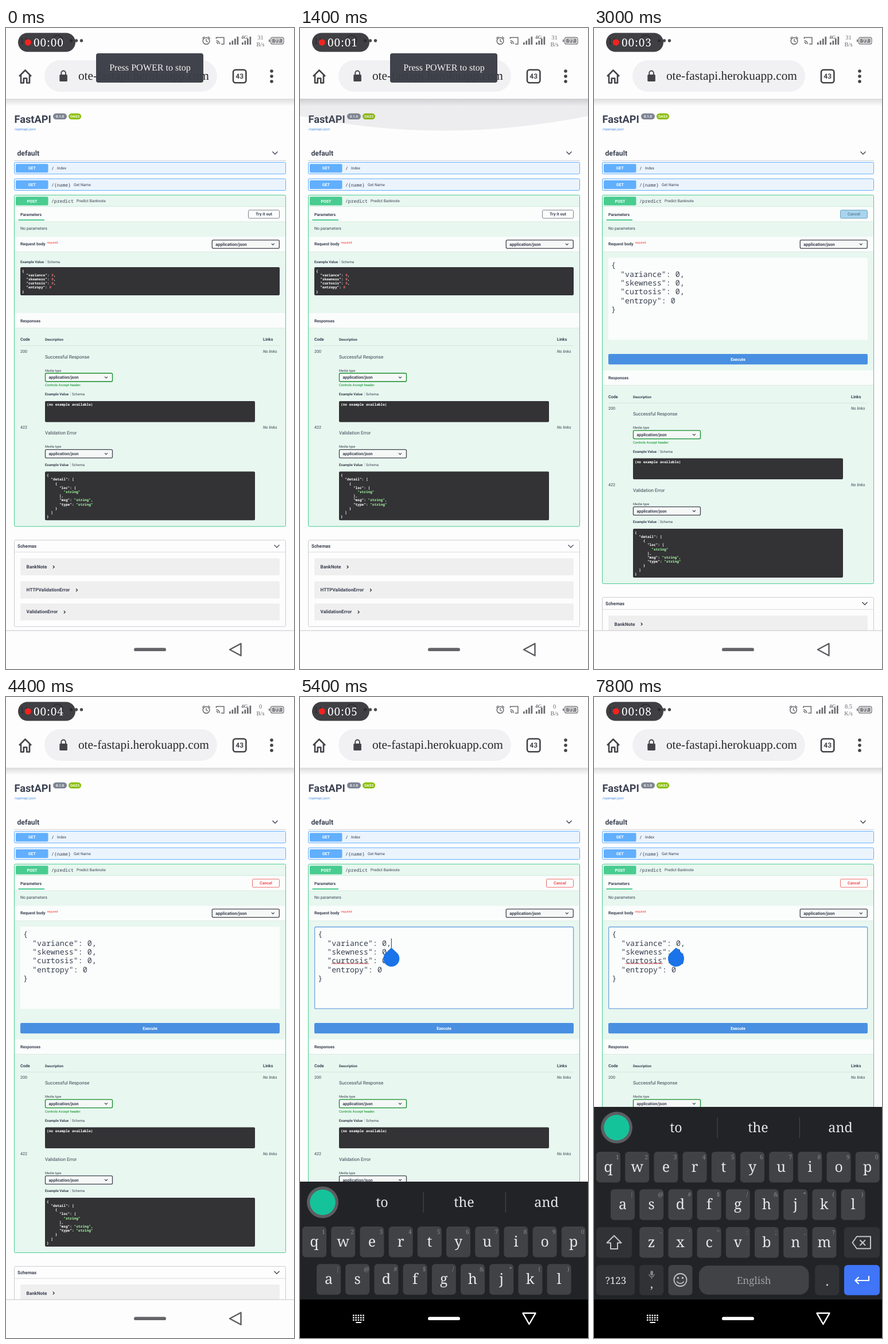
These frames come from a looping animation (502x1115 px, 8000 ms). An HTML page:

```html
<!DOCTYPE html>
<html lang="en">
<head>
<meta charset="utf-8">
<title>API docs on a phone</title>
<style>
html, body { margin: 0; width: 100%; height: 100%; overflow: hidden; background: #fff; }
svg { display: block; width: 502px; height: 1115px; }
text { font-family: Roboto, sans-serif; fill: #3b4151; white-space: pre; text-rendering: geometricPrecision; }
.b { font-weight: 700; }
.m { font-family: "Noto Sans Mono", monospace; }
.s { font-family: "Noto Serif", serif; }
.l { font-family: "Liberation Serif", serif; }
</style>
</head>
<body>
<svg id="stage" viewBox="0 0 502 1115" xmlns="http://www.w3.org/2000/svg"></svg>
<script>
const INK = '#3b4151', GREEN = '#49cc90', BLUE = '#61affe', DARK = '#444347';
const LOOP = 8000, STEP = 200, GROW = 99.6;

const esc = s => s.replace(/&/g, '&amp;').replace(/</g, '&lt;');
const text = (x, y, size, str, cls = '', more = '') =>
  `<text x="${x}" y="${y}" font-size="${size}" class="${cls}" ${more}>${esc(str)}</text>`;
const mid = (x, y, size, str, cls, fill) =>
  text(x, y, size, str, cls, `text-anchor="middle" style="fill:${fill}"`);
const tint = fill => `style="fill:${fill}"`;
const rect = (x, y, w, h, fill, rx = 0, more = '') =>
  `<rect x="${x}" y="${y}" width="${w}" height="${h}" rx="${rx}" fill="${fill}" ${more}/>`;
const edge = (color, width = 1) => `stroke="${color}" stroke-width="${width}"`;
const line = (d, color, width = 1, more = '') =>
  `<path d="${d}" fill="none" stroke="${color}" stroke-width="${width}" ${more}/>`;
const dot = (x, y, r, fill) => `<circle cx="${x}" cy="${y}" r="${r}" fill="${fill}"/>`;
const group = (id, body, more = '') => `<g id="${id}" ${more}>${body}</g>`;
const ROUND = 'stroke-linejoin="round" stroke-linecap="round"';

const down = (x, y, r, w = 1.2) =>
  line(`M${x - r} ${y - r / 2}l${r} ${r}l${r} ${-r}`, INK, w);
const right = (x, y) => line(`M${x - 1.2} ${y - 2.4}l2.4 2.4l-2.4 2.4`, '#222', 1.2);

function code(x, y, lines) {
  return lines.map((s, i) =>
    text(x, y + i * 7.2, 6.1, s, 'm b', tint('#fff'))
      .replace(/"string"(?=,?<)/, '<tspan fill="#a2fca2">$&</tspan>')
      .replace(/ 0(?=,?<)/, '<tspan fill="#d36363">$&</tspan>')).join('');
}
const panel = (x, y, w, h) => rect(x, y, w, h, '#333235', 2);

const select = (x, y, size, color) =>
  rect(x, y, 117, 14.5, '#f6f8f7', 2, edge(color, 1.3)) +
  text(x + 6, y + 9.8, size, 'application/json', 'b') + down(x + 106, y + 7.3, 2.4);

const tabs = (x, y) =>
  text(x, y, 6.2, 'Example Value', 'b') + line(`M${x + 44.3} ${y - 6}v7`, '#b5beba', .6) +
  text(x + 47, y, 6.1, 'Schema');

const verb = (y, name, color) =>
  rect(17, y, 56.5, 15, color, 2) + mid(45.4, y + 10, 7, name, 'b', '#fff');

const getRow = (y, path, x, label) =>
  rect(14.5, y, 473, 20.3, '#ebf4fd', 2, edge(BLUE)) + verb(y + 2.8, 'GET', BLUE) +
  text(79, y + 13.6, 8.1, path, 'm') + text(x, y + 12.8, 6.7, label);

const band = y => rect(15, y, 472, 26, '#fbfdfc') + rect(15, y + 25.6, 472, .8, '#d5e6dd');

function response(y, num, label, color, note) {
  return text(25, y, 7.1, num) + text(448, y, 7, 'No links', '', 'font-style="italic"') +
    text(68, y + 10, 8.1, label) + text(68, y + 33, 5.8, 'Media type') +
    select(68.5, y + 36, 7.2, color) +
    (note ? text(68, y + 58.7, 5.9, note, '', tint('#008a1c')) : '');
}

const JSON_KEYS = ['{', '  "variance": 0,', '  "skewness": 0,', '  "curtosis": 0,', '  "entropy": 0', '}'];
const DETAIL = ['{', '  "detail": [', '    {', '      "loc": [', '        "string"', '      ],',
  '      "msg": "string",', '      "type": "string"', '    }', '  ]', '}'];

const intro =
  text(14.5, 165, 18.2, 'FastAPI', 'b') +
  rect(82, 148.5, 24, 10.5, '#7d8492', 5.2) + mid(94, 156, 6, '0.1.0', 'b', '#fff') +
  rect(109, 148.5, 22, 10.5, '#89bf04', 5.2) + mid(120, 156, 6.3, 'OAS3', 'b', '#fff') +
  text(14.5, 178, 6.1, '/openapi.json', '', tint('#4990e2')) +
  text(19.5, 222, 12.2, 'default', 'b') + down(469, 217.3, 4.5, 1.3) +
  rect(14, 230, 474, .9, '#c9cacf') +
  getRow(233.6, '/', 89, 'Index') + getRow(262.2, '/{name}', 118, 'Get Name');

const post =
  `<rect id="box" x="14.5" y="290.7" width="473" height="576.3" rx="2" fill="#e8f7f0" ${edge(GREEN)}/>` +
  verb(293.5, 'POST', GREEN) + text(79, 304, 8.1, '/predict', 'm') + text(123, 303.2, 6.7, 'Predict Banknote') +
  rect(15, 310.5, 472, .8, '#b5e3cd') + band(311) +
  text(25, 326.6, 7.1, 'Parameters', 'b') + rect(21.5, 333, 45.5, 2, GREEN) +
  text(25, 351.2, 7.1, 'No parameters') +
  band(363.2) + text(25, 378.4, 7.1, 'Request body', 'b') +
  text(71.5, 375.2, 5.2, 'required', '', tint('#ff3030')) + select(359.3, 368.8, 7.5, '#41444e');

const example =
  rect(422.5, 316.8, 54, 14.2, '#fcfdfd', 2, edge('#7b7f88')) + mid(449.5, 326.3, 7.1, 'Try it out', 'b', INK) +
  group('tryTap', rect(422, 316.3, 55, 15.2, '#33b5e5', 1, 'opacity=".4"')) +
  tabs(25, 408.5) + panel(25, 416, 452, 49) + code(28, 424.6, JSON_KEYS);

const editor =
  group('cancelTap', rect(429.5, 316.8, 47, 14.2, '#a9d4ee', 2, edge('#6d9fc0')) +
    mid(453, 326.3, 7.1, 'Cancel', 'b', '#64859f')) +
  group('cancel', rect(429.5, 316.8, 47, 14.2, '#fdfdfd', 2, edge('#f06a6a')) +
    mid(453, 326.3, 7.1, 'Cancel', 'b', '#f05058')) +
  rect(25, 399.5, 452, 143, '#fafdfc', 2) +
  group('focus', rect(25.6, 400, 451, 142.2, 'none', 2, edge('#6ea4e0', 1.3)) +
    rect(55, 463.3, 65, 1, '#e0474c')) +
  group('body', JSON_KEYS.map((s, i) => text(30, 417.3 + i * 15.3, 13.3, s, 'm')).join('')) +
  group('caret', rect(-.5, 420, 1, 16.5, '#333')) +
  group('handle', '<path d="M0 436L10.2 445.4A14 14 0 1 1 -10.2 445.4Z" fill="#1a73e8"/>') +
  rect(25, 567, 452, 18.2, '#4990e2', 2) + mid(251, 578.6, 7.2, 'Execute', 'b', '#fff');

const schema = (y, h, name, x) =>
  rect(25, y, 452, h, '#f0eff0', 2) + text(35.5, y + h / 2 + 2.7, 8.15, name, 'b') + right(x, y + h / 2 + .2);

const lower =
  band(496) + text(25, 511.5, 7.1, 'Responses', 'b') +
  text(25, 544.4, 7.2, 'Code', 'b') + text(68, 544.2, 6.2, 'Description', 'b') + text(448, 544.4, 7.2, 'Links', 'b') +
  rect(25, 552.2, 452, .8, '#d0dfd7') +
  response(564.5, '200', 'Successful Response', '#128c28', 'Controls Accept header.') +
  tabs(68, 639) + panel(68, 649, 366, 36.4) + code(71, 657.3, ['(no example available)']) +
  response(697.3, '422', 'Validation Error', '#41444e') +
  tabs(68, 761.6) + panel(68, 771.5, 366, 84.8) + code(71, 780.2, DETAIL) +
  rect(14.5, 890.8, 473, 150.4, '#fdfdfd', 2, edge('#cbccd0')) +
  text(20, 904, 8, 'Schemas', 'b') + down(472, 901.4, 4.5, 1.3) + rect(15, 911.3, 472, .8, '#d3d4d8') +
  schema(922.5, 29.5, 'BankNote', 83) + schema(962.5, 30, 'HTTPValidationError', 123.3) +
  schema(1001, 29.5, 'ValidationError', 102);

const toolbar =
  rect(0, 0, 502, 123, '#fefdfe') + rect(0, 123, 502, 13, 'url(#shade)') +
  line('M23 84L33.5 73.5L44 84M26 82V95.5H30.8V87.5H36.2V95.5H41V82', DARK, 2.6, 'stroke-linejoin="round"') +
  rect(67, 56, 301, 55, '#f1f0f3', 27.5) +
  rect(93.3, 81, 13.6, 12, DARK, 1.6) + line('M96.3 81.5v-3.2a3.8 3.8 0 0 1 7.6 0v3.2', DARK, 1.9) +
  `<g clip-path="url(#url)">${text(354, 90, 21.4, 'ote-fastapi.herokuapp.com', 'l', 'text-anchor="end" style="fill:#29282b"')}</g>` +
  rect(396, 72.8, 22.4, 22.4, 'none', 4, edge(DARK, 2.6)) + mid(407.2, 88.3, 12, '43', 'b', DARK) +
  [75, 84, 93].map(y => dot(463, y, 2.8, DARK)).join('');

const bars = x => [4, 7, 10.5, 14].map((h, i) => rect(x + i * 4.5, 29 - h, 2.7, h, '#6b6a6e')).join('');
const GREY = '#6b6a6e';
const status =
  rect(0, 0, 502, 46, '#fefdfe') +
  [122.5, 131.5].map(x => dot(x, 22, 2.7, '#4b4a4e')).join('') +
  rect(21, 8.5, 100, 33, '#403f43', 16.5) +
  text(24, 28, 16, '11', 'l', tint('#29282b')) +
  `<circle cx="90" cy="21" r="8.5" fill="none" ${edge('#2a292c', 1.6)}/>` + dot(113.5, 22, 2.5, '#2a292c') +
  dot(38.3, 25, 5.6, '#f5231f') +
  `<text id="clock" x="48" y="31.5" font-size="19" class="s" letter-spacing="1" style="fill:#fff"></text>` +
  group('icons',
    `<circle cx="349" cy="22.5" r="5.8" fill="none" ${edge(GREY, 1.5)}/>` +
    line('M349 19v3.8l2.8 1.6M342 18.3l4-3.3M356 18.3l-4-3.3', GREY, 1.4) +
    line('M366.5 19v-2.5h13.4v11.5h-5M366.5 22a6 6 0 0 1 6 6M366.5 25a3 3 0 0 1 3 3', GREY, 1.5) +
    bars(389) + bars(411)) +
  text(410, 18.5, 9, '4G', 'l b', tint(GREY)) +
  ['rate', 'unit'].map((id, i) =>
    `<text id="${id}" x="443.5" y="${i ? 31.5 : 19.8}" font-size="10.5" class="l" text-anchor="middle" style="fill:${GREY}"></text>`).join('') +
  rect(461.5, 16.3, 22.5, 11.6, '#fefdfe', 3, edge(GREY, 1.2)) + rect(458, 19.8, 2, 4.6, GREY, 1) +
  rect(463.5, 18.2, 18.5, 7.8, '#8d8c90', 1.6) + mid(472.7, 25.8, 10, '77', 'l b', '#fff');

const nav =
  rect(0, 1048, 502, 67, '#fefdfe') + rect(0, 1047.6, 502, 1.4, '#d5d4d7') +
  rect(223, 1078.3, 56, 5.8, '#656468', 2.9) +
  line('M390 1081.3L409.5 1070.8V1091.8Z', '#5b5a5e', 2.4, ROUND);

const keyIcon = Array.from({ length: 15 }, (_, i) =>
  rect(92 + i % 5 * 4.3, 1074.5 + (i / 5 | 0) * 4, 2.6, 2.4, '#fff')).join('') + rect(97.5, 1087, 9.5, 2, '#fff');
const darkNav =
  rect(0, 1048, 502, 67, '#000') + keyIcon + rect(223, 1078.3, 56, 5.8, '#fff', 2.9) +
  line('M388.5 1071.8H410.5L399.5 1091Z', '#fff', 2.4, ROUND);

const KEY = '#404246', SIDE = '#303236', PALE = '#e6e7e9', HINT = '#85878b';
const keys = (letters, hints, x0, y) => [...letters].map((c, i) => {
  const x = x0 + i * 50.2;
  return rect(x - 21, y, 42, 53.5, KEY, 6) + mid(x, y + 35, 25, c, 's', PALE) +
    mid(x + 16, y + 13, 10.5, hints[i], 's', HINT);
}).join('');

const keyboard =
  rect(0, 713, 502, 402, '#222326') +
  dot(39.5, 749, 27.5, '#5c5e62') + dot(39.5, 749, 22.3, '#15c39a') +
  [['to', 143], ['the', 286], ['and', 429.5]].map(([w, x]) => mid(x, 757, 23.3, w, 's', PALE)).join('') +
  rect(214.6, 731, 1, 36, '#4a4c50') + rect(357.8, 731, 1, 36, '#4a4c50') +
  keys('qwertyuiop', '1234567890', 25, 791) +
  keys('asdfghjkl', '|@#$/&*()', 50, 856.3) +
  keys('zxcvbnm', '-\'":;,?', 100.2, 922) +
  rect(4, 922, 62, 53.5, SIDE, 6) + rect(436, 922, 62, 53.5, SIDE, 6) +
  line('M35 937L22.5 949.5H29V960H41V949.5H47.5Z', '#c4c5c8', 2, 'stroke-linejoin="round"') +
  line('M458 938.5H482V959.5H458L450.5 949ZM463.5 944.5l9.5 9.5M473 944.5l-9.5 9.5', '#c4c5c8', 2, 'stroke-linejoin="round"') +
  rect(4, 988, 67, 52.5, SIDE, 6) + mid(38, 1021, 17, '?123', 's', PALE) +
  rect(79.2, 988, 42, 52.5, SIDE, 6) + mid(100.5, 1028, 20, ',', 's', PALE) +
  rect(98.3, 998, 4.6, 8.5, HINT, 2.3) + line('M96 1004a4.6 4.6 0 0 0 9.2 0M100.6 1008.5v3.5', HINT, 1.3) +
  rect(129.5, 988, 42, 52.5, KEY, 6) +
  `<circle cx="150.5" cy="1014" r="11" fill="none" ${edge('#c4c5c8', 1.8)}/>` +
  dot(146.5, 1010.5, 1.7, '#c4c5c8') + dot(154.5, 1010.5, 1.7, '#c4c5c8') +
  line('M144.5 1016.5a6.4 5.5 0 0 0 12 0', '#c4c5c8', 1.8) +
  rect(183, 989, 191.5, 50.5, KEY, 16) + mid(278.7, 1021, 17, 'English', 's', '#9fa1a5') +
  rect(385.3, 988, 42, 52.5, SIDE, 6) + mid(406.5, 1024, 22, '.', 's', PALE) +
  rect(436, 988, 62, 52.5, '#3f75f6', 6) +
  line('M479 1007v8H456M461.5 1009l-6 6l6 6', '#fff', 2.2);

const stage = document.getElementById('stage');
stage.innerHTML = `<defs>
  <linearGradient id="shade" x1="0" y1="0" x2="0" y2="1">
    <stop offset="0" stop-color="#000" stop-opacity=".13"/><stop offset="1" stop-color="#000" stop-opacity="0"/>
  </linearGradient>
  <clipPath id="url"><rect x="125.5" y="56" width="240" height="55"/></clipPath>
</defs>` +
  rect(0, 0, 502, 1115, '#fefdfe') +
  group('page', intro + post + group('example', example) + group('editor', editor) + group('lower', lower) +
    group('glow', '<path d="M0 123H502V153Q251 204 0 153Z" fill="#8a868f" opacity=".14"/>') + toolbar) +
  status +
  group('toast', rect(157, 44, 187, 51, '#3a3d45', 4, 'opacity=".96"') +
    mid(251, 74.3, 16.1, 'Press POWER to stop', 'l', '#f4f4f5')) +
  nav + group('keyboard', keyboard) + group('darkNav', darkNav);

const el = {};
stage.querySelectorAll('[id]').forEach(n => el[n.id] = n);
const show = (id, on) => el[id].setAttribute('opacity', +on);
const move = (id, x, y) => el[id].setAttribute('transform', `translate(${x} ${y})`);

// Each track is [time, value] pairs; a value holds until the next.
const tracks = {
  scroll: [[0, 0], [800, -3], [1000, -10], [1200, 0]],
  glow: [[0, 0], [1200, .5], [1400, 1], [1600, .5], [1800, 0]],
  toast: [[0, 1], [1600, .5], [1800, 0]],
  rate: [[0, '31 B/s'], [3600, '0 B/s'], [6600, '8.5 K/s']],
  caret: [[0, 0], [5000, 1], [5800, 0], [6200, 1], [6800, 0], [7200, 1], [7800, 0]],
  caretX: [[0, 159.3], [7200, 143]],
  slide: [[0, 420], [5400, 130], [5600, 0]]
};
const at = (name, t) => tracks[name].filter(k => k[0] <= t).pop()[1];

function draw(now) {
  const t = Math.floor(now % LOOP / STEP) * STEP;
  const open = t >= 3000, focused = t >= 5000, typing = t >= 5400;
  el.clock.textContent = '00:0' + Math.floor((t + 200) / 1000);
  [el.rate.textContent, el.unit.textContent] = at('rate', t).split(' ');
  move('icons', t >= 6600 ? -1.5 : 0, 0);
  move('page', 0, at('scroll', t));
  show('glow', at('glow', t));
  show('toast', at('toast', t));
  show('example', !open);
  show('tryTap', t === 2800);
  show('editor', open);
  show('cancelTap', t === 3000);
  show('cancel', t > 3000);
  el.box.setAttribute('height', 576.3 + (open ? GROW : 0));
  move('lower', 0, open ? GROW : 0);
  show('focus', focused);
  move('body', focused ? 1.2 : 0, 0);
  show('caret', at('caret', t));
  show('handle', focused);
  move('caret', at('caretX', t), 0);
  move('handle', at('caretX', t), 0);
  show('keyboard', typing);
  move('keyboard', 0, at('slide', t));
  show('darkNav', typing);
}

function tick() {
  draw(performance.now());
  requestAnimationFrame(tick);
}
tick();
</script>
</body>
</html>
```
